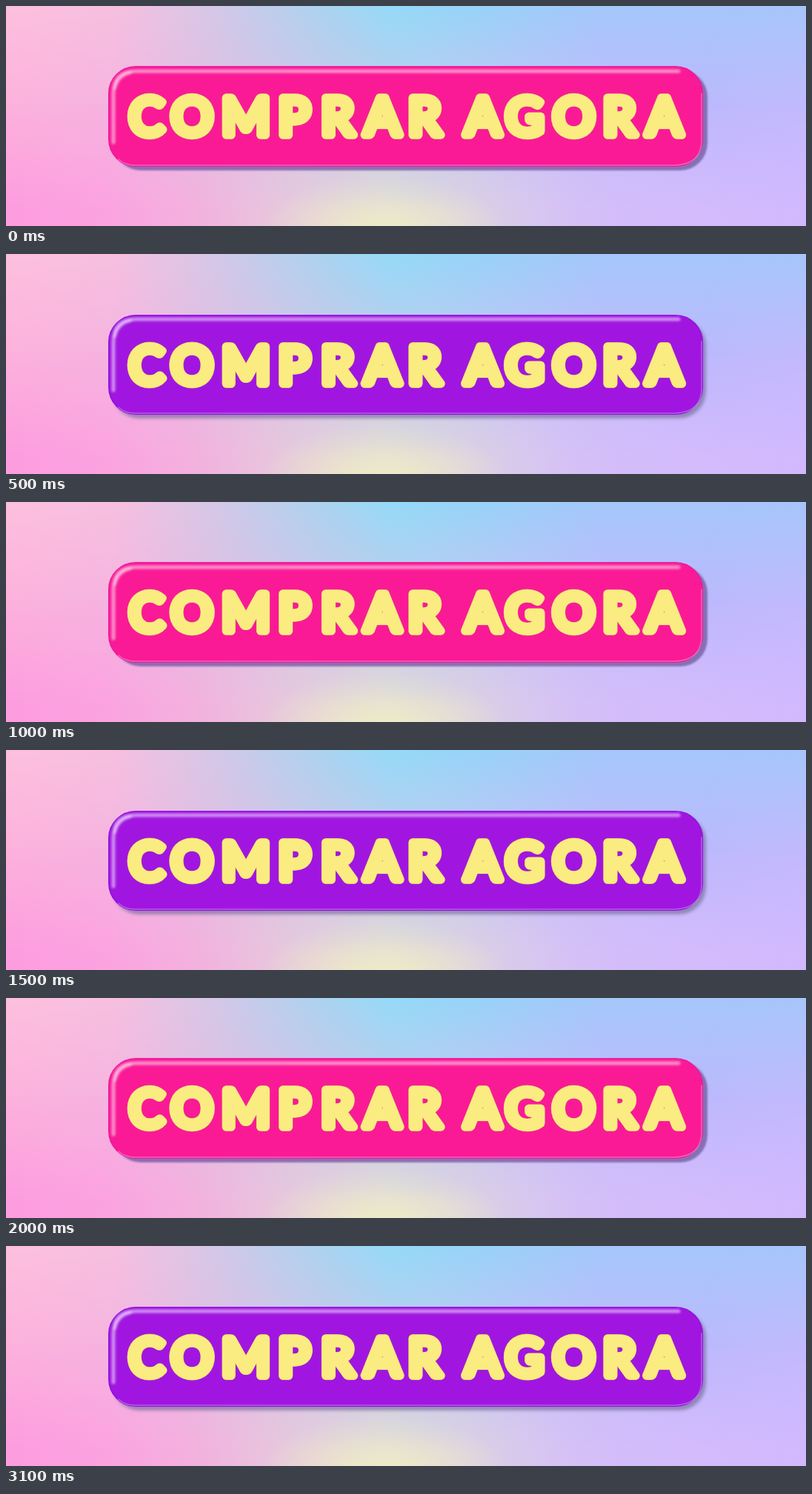
These frames come from a looping animation (1080x297 px, 3500 ms). An HTML page:

```html
<!DOCTYPE html>
<html lang="pt">
<head>
<meta charset="utf-8">
<title>Comprar agora</title>
<style>
  html, body { margin: 0; width: 100%; height: 100%; overflow: hidden; }
  .sky, svg { position: absolute; left: 0; top: 0; width: 1080px; height: 297px; }
  .middle { background: linear-gradient(90deg, #fdb2dc, #f6b4e0 130px, #dfc0e4 290px, #c2cdec 540px, #c4c4f6 680px, #c3bcfc 800px, #bdb9fd 950px, #c3bafe); }
  .top {
    background: linear-gradient(90deg, #fdbfde, #f6bfdf 150px, #cfc8e8 300px, #b2d1ee 400px, #94d9f7 520px, #98d2f8 640px, #a4c7fa 800px, #a6c5fb);
    -webkit-mask-image: linear-gradient(#000, transparent 140px);
    mask-image: linear-gradient(#000, transparent 140px);
  }
  .bottom {
    background:
      radial-gradient(170px 80px at 510px 310px, #f0eec4, #f0eec400),
      linear-gradient(90deg, #fd9cdf, #fca2e0 130px, #f3b0de 250px, #e6c8dd 380px, #dfd9d9 510px, #dacfe5 640px, #d6c3f3 740px, #d4bdfa 820px, #d2b8fe);
    -webkit-mask-image: linear-gradient(transparent 130px, #000 275px);
    mask-image: linear-gradient(transparent 130px, #000 275px);
  }
  text {
    font: 500 70px Lato, sans-serif;
    text-anchor: middle;
    stroke-linejoin: round;
    white-space: pre;
  }
</style>
</head>
<body>
<div class="sky middle"></div>
<div class="sky top"></div>
<div class="sky bottom"></div>
<svg viewBox="0 0 1080 297">
  <defs>
    <filter id="soft" x="-10%" y="-20%" width="120%" height="140%"><feGaussianBlur stdDeviation="1.6"/></filter>
    <filter id="shade" x="-10%" y="-20%" width="120%" height="140%"><feGaussianBlur id="blur"/></filter>
  </defs>
  <rect id="shadow" filter="url(#shade)"/>
  <rect id="body" stroke-width="2"/>
  <g id="shine" fill="none" stroke="#fff" stroke-linecap="round">
    <g filter="url(#soft)" stroke-width="5">
      <path d="M145 184V119Q145 88 176 88H908" stroke-opacity=".5"/>
      <path d="M147 111Q151 94 168 90" stroke-opacity=".45" stroke-width="4"/>
    </g>
    <path d="M152 207Q160 215 175 215H904Q939 213 939 181V118" stroke-opacity=".3" stroke-width="1.5"/>
  </g>
  <g id="label"></g>
</svg>
<script>
  const LOOP = 3500, STEP = 500, LAST = 5;
  const byId = id => document.getElementById(id);
  const set = (el, attrs) => Object.entries(attrs).forEach(([key, value]) => el.setAttribute(key, value));

  const skins = [
    { top: 81, fill: '#fa1a96', rim: '#f01a9a', shadow: '#8068ad', alpha: .9, blur: 1.3, dx: 7, baseline: 174 },
    { top: 82, fill: '#a016e0', rim: '#9413df', shadow: '#75699a', alpha: .65, blur: 2, dx: 5, baseline: 175 }
  ];
  const centers = [189.5, 251, 324, 389, 447.5, 508, 565, 604, 643.5, 700, 766.5, 828, 888.5];

  function addText(attrs) {
    const el = document.createElementNS('http://www.w3.org/2000/svg', 'text');
    el.textContent = 'COMPRAR AGORA';
    set(el, { x: centers.join(' '), ...attrs });
    byId('label').append(el);
  }
  addText({ fill: '#d9a271', stroke: '#d9a271', 'stroke-width': 11.8, 'aria-hidden': true });
  addText({ fill: '#faec80', stroke: '#faec80', 'stroke-width': 11.2 });

  function draw(time) {
    const step = Math.min(Math.floor(time % LOOP / STEP), LAST);
    const skin = skins[step % 2];
    const height = 217 - skin.top;
    set(byId('shadow'), { x: 138 + skin.dx, y: skin.top + 5, width: 802, height, rx: 37, fill: skin.shadow, opacity: skin.alpha });
    set(byId('blur'), { stdDeviation: skin.blur });
    set(byId('body'), { x: 139, y: skin.top + 1, width: 801, height: height - 2, rx: 36, fill: skin.fill, stroke: skin.rim });
    set(byId('label'), { transform: `translate(0 ${skin.baseline})` });
  }

  const start = performance.now();
  function tick() {
    draw(performance.now() - start);
    requestAnimationFrame(tick);
  }
  tick();
</script>
</body>
</html>
```
